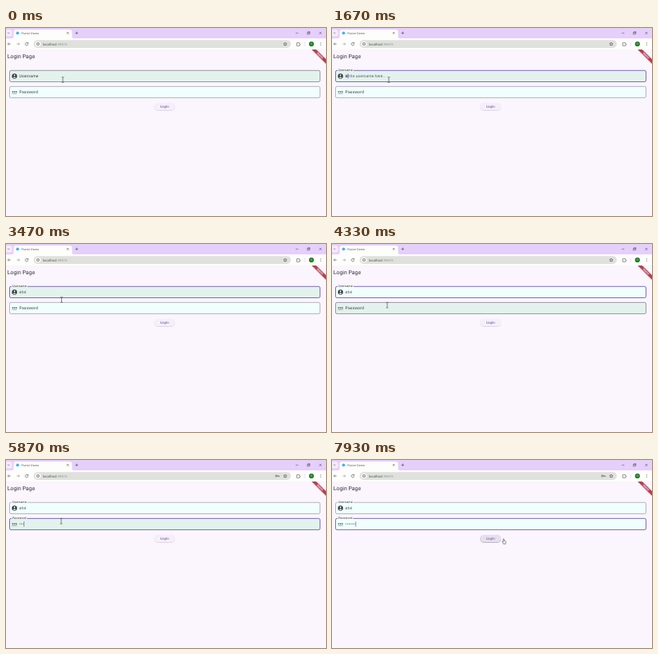
An HTML page that plays this animation: 400x236 px, repeating every 8 s.

```html
<!DOCTYPE html>
<html lang="en">
<head>
<meta charset="utf-8">
<title>Login Page</title>
<style>
  html, body { margin: 0; height: 100%; overflow: hidden; background: #fbf5fd; }
  svg { display: block; width: 100%; height: 100%; }
  text { font-family: Roboto, sans-serif; text-rendering: geometricPrecision; white-space: pre; }
  .ui { font-family: "Open Sans", sans-serif; }
  .line { fill: none; stroke: #3f4140; stroke-width: .55; }
  .body { font-size: 5px; letter-spacing: .15px; fill: #33363a; }
  .hint { font-size: 5px; letter-spacing: .05px; fill: #5a5e62; }
</style>
</head>
<body>
<svg viewBox="0 0 400 236">
  <defs>
    <clipPath id="page"><rect y="27" width="400" height="209"/></clipPath>
    <filter id="soft" x="-20%" y="-50%" width="140%" height="200%"><feGaussianBlur stdDeviation=".6"/></filter>
    <g id="star">
      <path d="M0-1V1M-.85-.5 .85 .5M-.85 .5 .85-.5" stroke="#3d4144" stroke-width=".5"/>
    </g>
  </defs>

  <!-- Browser -->
  <rect width="400" height="27" fill="#fdfdfb"/>
  <rect width="400" height="13" fill="#e5cffb"/>
  <rect x="-2" y="2" width="9.5" height="8.5" rx="2.5" fill="#f5ebfd"/>
  <path class="line" d="M2 5.7 3.2 6.9 4.4 5.7"/>
  <path d="M7 13Q9.5 13 9.5 10.5V5Q9.5 2 12.5 2H79.5Q82.5 2 82.5 5V10.5Q82.5 13 85 13Z" fill="#fdfdfb"/>
  <circle cx="14.5" cy="6.3" r="1.9" fill="#42b5e8"/>
  <text class="ui" x="19.2" y="7.7" font-size="3.6" fill="#4a4d4c">Flutter Demo</text>
  <path class="line" d="M76 5.1 78.4 7.5M78.4 5.1 76 7.5M86.6 6.3H90.2M88.4 4.5V8.1M362.3 6.4H365.3M391.6 4.9 394.4 7.7M394.4 4.9 391.6 7.7"/>
  <path class="line" d="M376.7 5.5H379V7.8H376.7ZM377.5 5.4V4.7H379.8V7H379.1"/>
  <path class="line" d="M5.8 20H2.3M3.9 18.4 2.3 20 3.9 21.6"/>
  <path class="line" stroke-opacity=".6" d="M13.3 20H16.8M15.2 18.4 16.8 20 15.2 21.6"/>
  <path class="line" d="M27.5 19.2A1.8 1.8 0 1 0 27.7 20.5M27.7 17.9V19.3H26.3"/>
  <rect x="34.5" y="15.2" width="321.5" height="9.7" rx="4.85" fill="#dfe1dd"/>
  <circle cx="40" cy="20" r="3.3" fill="#fdfdfb"/>
  <circle class="line" cx="40" cy="20" r="1.7"/>
  <path class="line" d="M40 19.7V21M40 18.8V19.2"/>
  <text class="ui" x="46" y="21.5" font-size="4.2" fill="#3f4140">localhost<tspan fill="#868986">:59615</tspan></text>
  <g id="key" class="line"><circle cx="337.9" cy="20" r="1.1"/><path d="M339 20H341.7V21.1M340.5 20V21"/></g>
  <path class="line" d="M349 18 349.6 19.4 351.1 19.5 350 20.5 350.3 22 349 21.2 347.7 22 348 20.5 346.9 19.5 348.4 19.4Z"/>
  <path class="line" stroke-width=".7" d="M363.2 18.9H364.3A.75.75 0 0 1 365.8 18.9H367V20A.75.75 0 0 1 367 21.5V22.3H363.2V21.2A.7.7 0 0 0 363.2 19.9Z"/>
  <path d="M373.3 17.5V22.5" stroke="#e5cffb" stroke-width=".6"/>
  <circle cx="381.8" cy="20" r="3.1" fill="#1b7a20"/>
  <text x="381.8" y="21.3" font-size="3.5" text-anchor="middle" fill="#d8efda">O</text>
  <g fill="#3f4140"><circle cx="393.3" cy="18.3" r=".45"/><circle cx="393.3" cy="20" r=".45"/><circle cx="393.3" cy="21.7" r=".45"/></g>

  <!-- Page -->
  <text x="1.8" y="38.3" font-size="6.9" fill="#35333a">Login Page</text>
  <g clip-path="url(#page)">
    <g transform="translate(400 27) rotate(45)">
      <rect x="-14" y="8.75" width="28" height="3.75" fill="#601010" opacity=".45" filter="url(#soft)"/>
      <rect x="-14" y="8.75" width="28" height="3.75" fill="#b5404f"/>
      <text y="11.75" font-size="3.15" font-weight="900" text-anchor="middle" fill="#f3dfe4">DEBUG</text>
    </g>
  </g>
  <g id="fields"></g>
  <g fill="#2f3336">
    <path fill-rule="evenodd" d="M10.6 57.3A3.15 3.15 0 1 0 10.6 63.6 3.15 3.15 0 1 0 10.6 57.3ZM10.6 58.3A1.05 1.05 0 1 1 10.6 60.4 1.05 1.05 0 1 1 10.6 58.3ZM8.6 61.9Q10.6 60.4 12.6 61.9 10.6 63.8 8.6 61.9Z"/>
    <rect x="7.5" y="82" width="6.25" height=".6" opacity=".55"/>
  </g>
  <use href="#star" x="8.4" y="80.2"/><use href="#star" x="10.6" y="80.2"/><use href="#star" x="12.8" y="80.2"/>
  <rect id="shade" x="185.2" y="94.4" width="26" height="9.5" rx="4.75" fill="#000" filter="url(#soft)"/>
  <rect id="button" x="185.2" y="93.9" width="26" height="9.4" rx="4.7"/>
  <text x="198.2" y="100.1" font-size="4.37" font-weight="500" letter-spacing=".03" text-anchor="middle" fill="#7b6cab">Login</text>
  <path id="beam" d="M-1.5-3.3H-.5L0-2.9 .5-3.3H1.5M0-2.9V2.9M-1.5 3.3H-.5L0 2.9 .5 3.3H1.5" fill="none" stroke="#333" stroke-width=".6"/>
  <path id="hand" d="M-.9-3.1Q-.4-3.6 .1-3.1V-.9L1.9-.5Q2.5-.3 2.4.4L2 2.2V3H-.8V2.3L-2.3.3Q-2.1-.5-1.3 0L-.9.4Z" fill="#fff" stroke="#222" stroke-width=".5"/>
</svg>
<script>
const LOOP = 8000, NAME = "otvi";
const $ = id => document.getElementById(id);
const set = (el, attrs) => { for (const k in attrs) el.setAttribute(k, attrs[k]); };
const ease = (t, start, span = 200) => {
  const p = Math.min(1, Math.max(0, (t - start) / span));
  return p * p * (3 - 2 * p);
};
const count = (times, t) => times.filter(s => s <= t).length;
const between = (t, a, b) => t >= a && t < b;
const mix = (a, b, k) => a + (b - a) * k;
const blend = (a, b, k) => `rgb(${a.map((v, i) => Math.round(mix(v, b[i], k)))})`;

const nameKeys = [1670, 2000, 2070, 2470];
const passKeys = [5330, 5600, 5800, 5930, 6270, 6730, 6730];
// Pointer stops: time, x, y
const stops = [[0, 71, 65], [3470, 69.5, 70], [3930, 69, 76.7], [7470, 131, 88],
  [7670, 160, 94], [7730, 183, 99], [7800, 202, 102], [7870, 212, 102.5], [7930, 215, 102.3]];

function add(parent, tag, attrs, text = "") {
  const el = document.createElementNS("http://www.w3.org/2000/svg", tag);
  set(el, attrs);
  el.textContent = text;
  return parent.appendChild(el);
}

function makeField(y, label, hint, gap) {
  const g = $("fields");
  const left = 4.5, right = 392.5, height = 14.2, r = 1.7;
  const bottom = y + height, base = y + 8.8;
  const fill = add(g, "rect", { x: left, y, width: right - left, height, rx: r });
  const edge = add(g, "path", { fill: "none" });
  const name = add(g, "text", { class: "body" }, label);
  const tip = add(g, "text", { class: "hint", x: 16.6, y: base }, hint);
  const value = add(g, "text", { class: "body", x: 16.6, y: base });
  const caret = add(g, "rect", { y: y + 3.8, width: .6, height: 6.6, fill: "#5b4d9c" });

  return ({ hover, focus, float, hintAlpha, text, caretOn }) => {
    set(fill, { fill: hover ? "#e4f2ee" : "#f0fffd" });
    const from = mix(17, 7.2, float), to = mix(17, gap, float);
    set(edge, {
      d: `M${to} ${y}H${right - r}Q${right} ${y} ${right} ${y + r}V${bottom - r}Q${right} ${bottom} ${right - r} ${bottom}` +
         `H${left + r}Q${left} ${bottom} ${left} ${bottom - r}V${y + r}Q${left} ${y} ${left + r} ${y}H${from}`,
      stroke: blend(hover ? [62, 64, 68] : [112, 116, 124], [92, 80, 160], focus),
      "stroke-width": mix(.5, .8, focus)
    });
    set(name, {
      transform: `translate(${mix(16.6, 7.9, float)} ${mix(base, y + 1, float)}) scale(${mix(1, .75, float)})`,
      fill: blend([90, 94, 99], [112, 98, 168], focus)
    });
    set(tip, { opacity: hintAlpha });
    if (value.textContent !== text) value.textContent = text;
    const width = text ? value.getComputedTextLength() : 0;
    set(caret, { x: 16.7 + width, opacity: caretOn ? 1 : 0 });
  };
}

const user = makeField(53.3, "Username", "Write username here...", 26.8);
const pass = makeField(73.4, "Password", "Write your password here...", 26.3);

function draw(t) {
  const first = ease(t, 930), second = ease(t, 4390, 160);
  const typed = count(nameKeys, t), dots = count(passKeys, t);
  user({
    hover: t < 3930, focus: first - second, float: first,
    hintAlpha: t < 1730 ? first : 0,
    text: NAME.slice(0, typed),
    caretOn: between(t, 1130, 3000)
  });
  pass({
    hover: between(t, 3930, 7670), focus: second, float: second,
    hintAlpha: dots ? 0 : second,
    text: "•".repeat(dots),
    caretOn: between(t, 4530, 5000) || between(t, 5330, 7330) || t >= 7830
  });
  set($("key"), { opacity: t >= 5000 ? 1 : 0 });

  const over = ease(t, 7730, 140);
  set($("button"), { fill: blend([246, 239, 251], [231, 223, 239], over) });
  set($("shade"), { opacity: mix(.14, .3, over) });

  const [, x, y] = stops[count(stops.map(s => s[0]), t) - 1];
  const onButton = t >= 7730;
  set($("beam"), { transform: `translate(${x} ${y})`, opacity: onButton ? 0 : 1 });
  set($("hand"), { transform: `translate(${x} ${y})`, opacity: onButton ? 1 : 0 });
}

const start = performance.now();
function tick(now) {
  draw(Math.max(0, now - start) % LOOP);
  requestAnimationFrame(tick);
}
draw(0);
requestAnimationFrame(tick);
</script>
</body>
</html>
```
